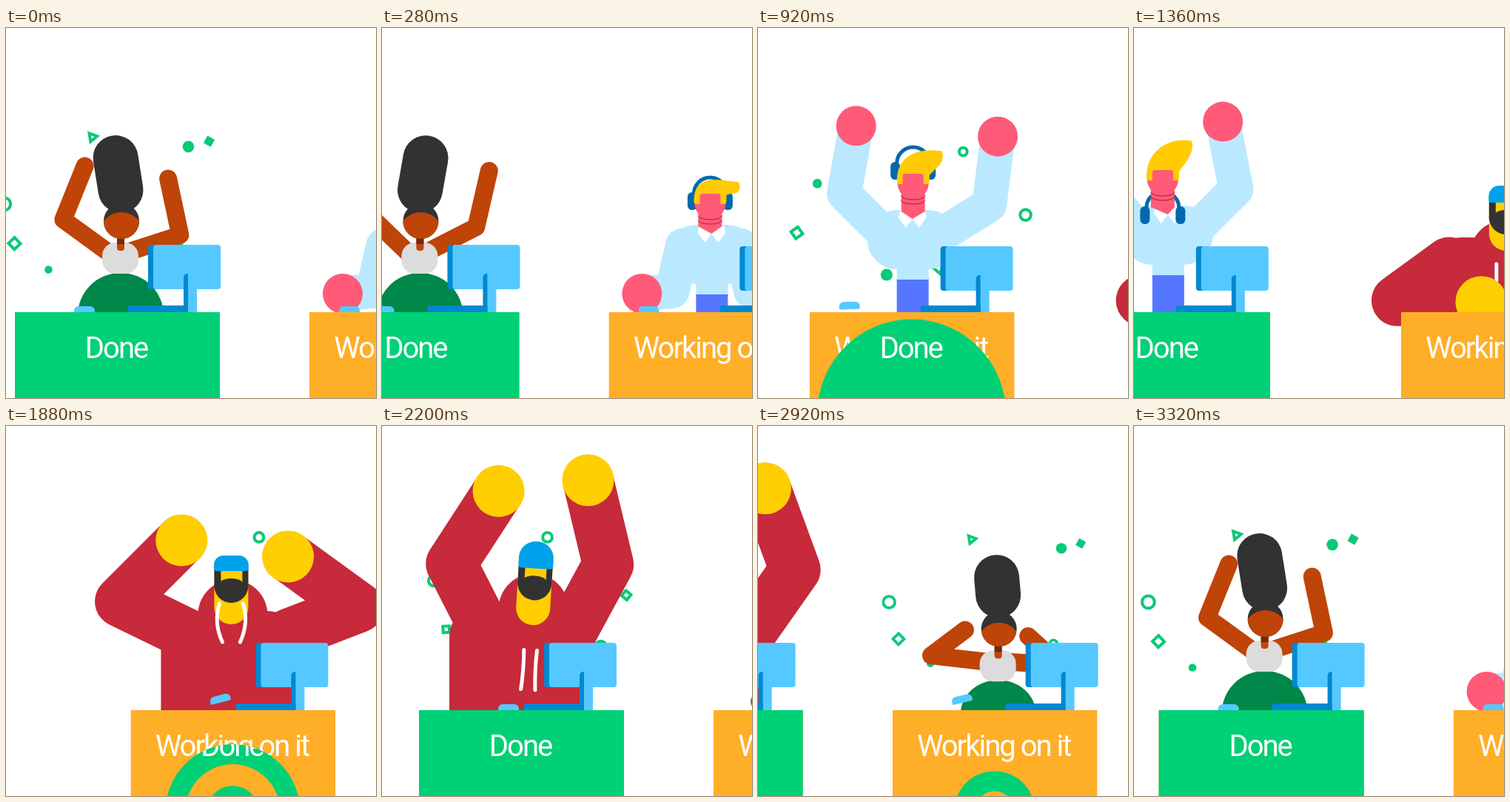
An HTML page with a canvas that plays this animation: 500x500 px, repeating every 3.36 s.

```html
<!DOCTYPE html>
<html>
<head>
<meta charset="utf-8">
<style>
html, body { margin: 0; height: 100%; overflow: hidden; background: #fff; }
canvas { display: block; }
</style>
</head>
<body>
<canvas id="stage" width="500" height="500"></canvas>
<script>
const ctx = document.getElementById('stage').getContext('2d');
const LOOP = 3360, STEP = 40, SPEED = 0.37, TAU = Math.PI * 2, DEG = Math.PI / 180;
const GREEN = '#00d076', ORANGE = '#ffae28', SKY = '#55c9ff', BLUE = '#0088d1', DARK = '#323232';
const BROWN = '#bf4408', PINK = '#ff5a78', SHIRT = '#bae9ff', YELLOW = '#ffce00', RED = '#c62a3b';
const BLOND = '#ffcb00', NAVY = '#0068ac';
const MID = 139, DESK = 384;

const clamp = v => Math.max(0, Math.min(1, v));
const easeOut = v => 1 - (1 - clamp(v)) ** 3;
const random = n => { const s = Math.sin(n * 12.9898) * 43758.5453; return s - Math.floor(s); };

function fill(color, path) {
  ctx.fillStyle = color;
  ctx.beginPath();
  path();
  ctx.fill();
}
function stroke(width, color, path) {
  ctx.lineWidth = width;
  ctx.strokeStyle = color;
  ctx.lineCap = ctx.lineJoin = 'round';
  ctx.beginPath();
  path();
  ctx.stroke();
}
const polyline = pts => pts.forEach(p => ctx.lineTo(...p));
const disc = (x, y, r, color) => fill(color, () => ctx.arc(x, y, Math.max(0, r), 0, TAU));
const oval = (x, y, rx, ry, color) => fill(color, () => ctx.ellipse(x, y, rx, ry, 0, 0, TAU));
const box = (x, y, w, h, color, r = 0) => fill(color, () => ctx.roundRect(x, y, w, h, r));

// Both arms as shoulder, elbow, hand. Raise lifts the upper arm above
// horizontal, tuck leans the forearm inward from vertical (degrees).
function armsOf({ mid = MID, wide, y, raise, tuck, bones: [upper, fore] }) {
  return [-1, 1].map((side, i) => {
    const r = raise[i] * DEG, t = tuck[i] * DEG;
    const shoulder = [mid + side * wide, y];
    const elbow = [shoulder[0] + side * upper * Math.cos(r), y - upper * Math.sin(r)];
    const hand = [elbow[0] - side * fore * Math.sin(t), elbow[1] - fore * Math.cos(t)];
    return [shoulder, elbow, hand];
  });
}
const sleeves = (arms, width, color) => arms.forEach(a => stroke(width, color, () => polyline(a)));
const fists = (arms, r, color) => arms.forEach(a => disc(...a[2], r, color));

const woman = {
  rise: 520, sway: 280, screen: [180, 293], mouse: 80, seed: 3,
  work: { wide: 13, y: 337, raise: [-29, -29], tuck: [90, 90], bones: [73, 33],
    chest: 319, hips: [42, 30], bun: 50, hair: 0, lean: 0, brow: -4 },
  cheer: { wide: 13, y: 303, raise: [36, 18], tuck: [22, 12], bones: [75, 78],
    chest: 290, hips: [58, 57], bun: 42, hair: 44, lean: -9, brow: -12 },
  dance: { raise: [44, 27], tuck: [0, -13], lean: 10 },

  draw(v) {
    const x = 144, y = v.chest - 29, a = v.lean * DEG;
    oval(143, 388, ...v.hips, '#00874a');
    sleeves(armsOf(v), 24, BROWN);
    box(118, v.chest, 49, 42, '#dcdcdc', 18);
    stroke(61, DARK, () => polyline([[x - 1, y - v.bun],
      [x - 1 + v.hair * Math.sin(a), y - v.bun - v.hair * Math.cos(a)]]));
    box(x - 6, y + 18, 10, 22, BROWN, 4);
    box(x - 6, y + 18, 10, 13, '#74290a');
    ctx.save();
    disc(x, y, 24, DARK);
    ctx.clip();
    disc(x, y + v.brow + 30, 30, BROWN);
    ctx.restore();
  }
};

const man = {
  rise: 280, sway: 440, screen: [177, 295], mouse: 40, openHand: true, seed: 8,
  work: { wide: 39, y: 294, raise: [-77, -77], tuck: [-95, -95], bones: [63, 41],
    hem: 360, head: [137, 237], tip: -25, phones: -13 },
  cheer: { wide: 32, y: 284, raise: [45, 32], tuck: [10, -7], bones: [85, 93],
    hem: 340, head: [140, 210], tip: -40, phones: -27 },
  dance: { y: 278, raise: [47, 45], tuck: [10, 11], hem: 334, head: [132, 205], tip: -49, phones: 38 },

  draw(v) {
    const arms = armsOf(v), [x, y] = v.head, collar = v.hem - 84;
    box(118, v.hem - 2, 43, 400 - v.hem, '#5577ff');
    box(78, v.hem - 94, 122, 80, SHIRT, 40);
    box(118, v.hem - 90, 43, 90, SHIRT);
    sleeves(arms, 47, SHIRT);
    fists(arms, 27, PINK);
    for (const side of [-1, 1]) {
      fill('#fff', () => polyline([[MID, collar + 2], [MID + side * 9, collar + 14],
        [MID + side * 19, collar], [MID + side * 16, collar - 10], [MID, collar - 10]]));
    }
    this.headphones(x, y + v.phones);
    fill(PINK, () => polyline([[x - 16, y], [x + 16, y], [x + 16, collar - 8], [MID, collar + 2], [x - 16, collar - 8]]));
    disc(x, y, 21, PINK);
    for (const d of [17, 23]) stroke(1, '#a3203f', () => ctx.ellipse(x, y + d, 16, 5, 0, 0, Math.PI));
    this.quiff(x, y, x + 36, y + v.tip);
    box(x - 14, y - 13, 28, 16, PINK, 3);
  },
  headphones(x, y) {
    stroke(5, NAVY, () => ctx.arc(x, y, 22, Math.PI, TAU));
    for (const side of [-1, 1]) box(x + side * 24 - 6.5, y - 2, 13, 24, NAVY, 6);
  },
  quiff(x, y, tipX, tipY) {
    const path = () => {
      ctx.moveTo(x - 18, y - 3);
      ctx.bezierCurveTo(x - 18, y - 34, tipX - 30, tipY - 4, tipX, tipY);
      ctx.bezierCurveTo(tipX + 2, tipY + 14, x + 24, y - 22, x + 18, y - 12);
      ctx.lineTo(x + 18, y - 3);
      ctx.closePath();
    };
    fill(BLOND, path);
    stroke(8, BLOND, path);
  }
};

const hoodie = {
  rise: 200, sway: 640, screen: [169, 293], mouse: 107, seed: 5,
  work: { mid: 139, wide: 74, y: 317, raise: [-36, -36], tuck: [91, 91], bones: [87, 114],
    hood: [140, 307], body: 283, head: [142, 256], cap: 43, chin: 45, tilt: 0, cord: [13, 63, 22, 0] },
  cheer: { mid: 145, wide: 69, y: 281, raise: [26, 21], tuck: [45, 54], bones: [100, 117],
    hood: [138, 255], body: 250, head: [136, 216], cap: 41, chin: 52, tilt: 0, cord: [16, 24, 52, 8] },
  dance: { mid: 148, wide: 61, y: 276, raise: [57, 55], tuck: [35, 20],
    hood: [152, 248], body: 245, head: [153, 213], cap: 54, chin: 56, tilt: 3, cord: [10, 80, 53, 0] },

  draw(v) {
    const arms = armsOf(v), [hoodX, hoodY] = v.hood;
    box(41, v.body, 184, 400 - v.body, RED, [40, 40, 0, 0]);
    sleeves(arms, 69, RED);
    box(hoodX - 47, hoodY - 47, 94, 110, RED, [47, 47, 0, 0]);
    ctx.save();
    ctx.translate(...v.head);
    ctx.rotate(v.tilt * DEG);
    box(-23, -25, 46, v.chin + 25, YELLOW, [0, 0, 23, 23]);
    disc(0, 0, 23, DARK);
    box(-23, -24, 46, 26, DARK);
    box(-14, -24, 29, 20, YELLOW);
    oval(0, -4, 15, 6, DARK);
    box(-23.5, -v.cap, 47, v.cap - 20, '#00a2eb', [(v.cap - 20) * .62, (v.cap - 20) * .62, 4, 4]);
    const [gap, top, length, bulge] = v.cord;
    for (const side of [-1, 1]) {
      stroke(5, '#fff', () => {
        ctx.moveTo(side * gap, top);
        ctx.quadraticCurveTo(side * (gap + bulge), top + length / 2, side * (gap - bulge / 2), top + length);
      });
    }
    ctx.restore();
    fists(arms, 35, YELLOW);
  }
};

// Who, desk position and moment of completion.
const cast = [[woman, 12, -520], [man, 410, 640], [hoodie, 864, 1680], [woman, 1262, 2800], [man, 1660, Infinity]];

function mix(a, b, k) {
  if (typeof a === 'number') return a + (b - a) * k;
  if (Array.isArray(a)) return a.map((v, i) => mix(v, b[i], k));
  return Object.fromEntries(Object.keys(a).map(key => [key, mix(a[key], b[key], k)]));
}

// Arms fly up, then rock around the dance pose with fading swings.
function poseAt({ work, cheer, dance, rise, sway }, p) {
  if (p <= 0) return work;
  if (p < rise) return mix(work, cheer, easeOut(p / rise));
  const q = (p - rise) / sway;
  return mix(cheer, { ...cheer, ...dance }, 1 - Math.exp(-2.6 * q) * Math.cos(1.5 * Math.PI * q));
}

function drawConfetti(seed, p) {
  const spread = easeOut(p / 200), size = spread * clamp((700 - p) / 160);
  if (p <= 0 || !size) return;
  ctx.strokeStyle = ctx.fillStyle = '#08c978';
  ctx.lineJoin = 'miter';
  ctx.lineWidth = 4;
  for (let i = 0; i < 8; i++) {
    const roll = n => random(seed * 50 + i * 5 + n);
    const angle = (i + roll(0)) * TAU / 8, reach = spread * (110 + 60 * roll(1));
    const sides = [0, 3, 0, 4][i % 4], r = 5 + 4 * roll(2), turn = TAU * roll(3);
    ctx.save();
    ctx.translate(MID + reach * Math.cos(angle), 240 + reach * .8 * Math.sin(angle));
    ctx.scale(size, size);
    ctx.beginPath();
    if (!sides) ctx.arc(0, 0, r, 0, TAU);
    for (let k = 0; k < sides; k++) {
      const a = turn + k * TAU / sides;
      ctx.lineTo(r * Math.cos(a), r * Math.sin(a));
    }
    ctx.closePath();
    roll(4) < .3 ? ctx.fill() : ctx.stroke();
    ctx.restore();
  }
}

function drawMouse(x, p) {
  const hop = Math.sin(Math.PI * clamp(p / 330));
  ctx.save();
  ctx.translate(x + 14, 381 - 13 * hop);
  ctx.rotate(-.3 * hop ** 3);
  box(-14, -5, 28, 10, SKY, [6, 6, 2, 2]);
  ctx.restore();
}

function drawScreen(x, y) {
  box(x, y, 20, 60, BLUE, 4);
  box(x + 7, y, 91, 60, SKY, 4);
  box(x + 48, y + 39, 10, 345 - y, BLUE, [5, 0, 0, 0]);
  box(x + 54, y + 39, 12, 345 - y, SKY);
  box(x - 27, 375, 81, 9, BLUE, [3, 0, 0, 0]);
}

function drawDesk(p) {
  const front = color => box(0, DESK, 277, 116, color);
  const label = text => {
    ctx.fillStyle = '#fff';
    ctx.fillText(text, 137, 446);
  };
  ctx.save();
  ctx.beginPath();
  ctx.rect(0, DESK, 277, 116);
  ctx.clip();
  ctx.font = '40px Roboto, "Open Sans", sans-serif';
  ctx.letterSpacing = '-2px';
  ctx.textAlign = 'center';
  front(ORANGE);
  label('Working on it');
  if (p > 0) {
    ctx.beginPath();
    ctx.arc(138, 521, p * .455, 0, TAU);
    ctx.clip();
    front(GREEN);
    disc(138, 521, (p - 60) * .457, ORANGE);
    disc(138, 521, (p - 158) * .83, GREEN);
    label('Done');
  }
  ctx.restore();
}

function draw() {
  // The scene advances 25 times a second.
  const t = Math.floor(performance.now() % LOOP / STEP) * STEP;
  ctx.fillStyle = '#fff';
  ctx.fillRect(0, 0, 500, 500);
  for (const [who, base, start] of cast) {
    const x = base - SPEED * t, p = t - start;
    if (x < -420 || x > 560) continue;
    ctx.save();
    ctx.translate(x, 0);
    drawConfetti(who.seed, p);
    who.draw(poseAt(who, p));
    if (p > 0 || who.openHand) drawMouse(who.mouse, p);
    drawScreen(...who.screen);
    drawDesk(p);
    ctx.restore();
  }
  requestAnimationFrame(draw);
}
draw();
</script>
</body>
</html>
```
